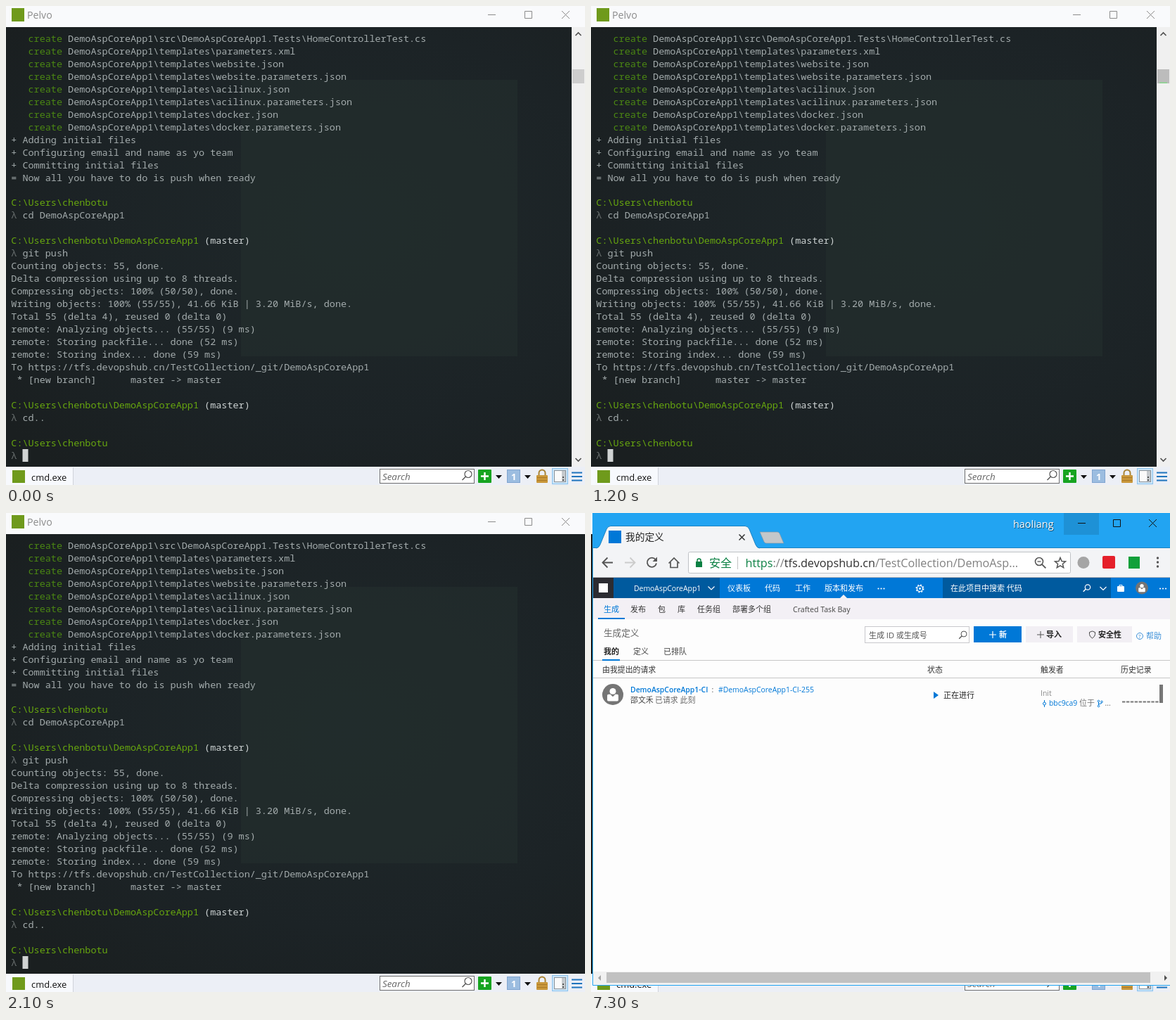
Animation, 823 px wide and 681 px high, one loop 8000 ms. Source, as an HTML page:

```html
<!DOCTYPE html>
<html lang="zh-CN">
<head>
<meta charset="utf-8">
<title>Push and build</title>
<style>
html, body { margin: 0; width: 100%; height: 100%; overflow: hidden; background: #1c2326; }
svg { display: block; width: 823px; height: 681px; }
text { white-space: pre; font-family: "Open Sans", "Noto Sans CJK SC", "Noto Sans CJK", sans-serif; }
.mono text { font: 13.47px "Noto Sans Mono", "DejaVu Sans Mono", monospace; }
</style>
</head>
<body>
<svg id="stage" viewBox="0 0 823 681" xmlns="http://www.w3.org/2000/svg"></svg>
<script>
const LOOP = 8000;
const USER = 'C:\\Users\\chenbotu';
const APP = 'DemoAspCoreApp1';
const BLUE = '#0078d7';

const rect = (x, y, w, h, fill, extra = '') =>
  `<rect x="${x}" y="${y}" width="${w}" height="${h}" fill="${fill}" ${extra}/>`;
const box = (x, y, w, h, fill, stroke) =>
  rect(x + .5, y + .5, w - 1, h - 1, fill, `stroke="${stroke}"`);
const disc = (x, y, r, fill, extra = '') =>
  `<circle cx="${x}" cy="${y}" r="${r}" fill="${fill}" ${extra}/>`;
const line = (d, stroke, w = 1, extra = '') =>
  `<path d="${d}" fill="none" stroke="${stroke}" stroke-width="${w}" ${extra}/>`;
const shape = (d, fill, extra = '') => `<path d="${d}" fill="${fill}" ${extra}/>`;
const text = (x, y, s, fill, size = 11, extra = '') =>
  `<text x="${x}" y="${y}" fill="${fill}" font-size="${size}" ${extra}>${s}</text>`;
const lens = (x, y, r, stroke, side = -1, w = 1.2) =>
  disc(x, y, r, 'none', `stroke="${stroke}" stroke-width="${w}"`) +
  line(`M${x + side * r * .7} ${y + r * .7}l${side * r} ${r}`, stroke, w + .3);
const dots = (x, y, dx, dy, r, fill) =>
  [0, 1, 2].map(i => disc(x + i * dx, y + i * dy, r, fill)).join('');
const winButtons = (x, y, gap, c) =>
  line(`M${x} ${y}.5h11M${x + gap} ${y - 4.5}h10v10h-10zM${x + gap * 2} ${y - 5}l11 11m0 -11l-11 11`, c);
const person = (x, y, r, fill, bg) =>
  disc(x, y, r, bg) + disc(x, y - r * .3, r * .3, fill) +
  rect(x - r * .53, y - r * .02, r * 1.06, r * .66, fill, `rx="${r * .12}"`) +
  shape(`M${x - r * .24} ${y - r * .02}h${r * .48}l${-r * .24} ${r * .24}z`, bg);

// Each row is a list of [column, colour key, string].
const INK = { c: '#4b8713', p: '#67a60f', t: '#a3abac', b: '#cdd3d3', l: '#676d6d' };
const row = s => [[0, 't', s]];
const made = s => [[3, 'c', 'create'], [10, 't', APP + '\\' + s]];
const path = [[0, 'p', USER]];
const repo = [[0, 'p', USER + '\\' + APP], [USER.length + APP.length + 2, 'b', '(master)']];
const cmd = s => [[0, 'l', 'λ'], [2, 't', s]];
const rows = [
  made(`src\\${APP}.Tests\\HomeControllerTest.cs`),
  ...['parameters.xml', 'website.json', 'website.parameters.json', 'acilinux.json',
    'acilinux.parameters.json', 'docker.json', 'docker.parameters.json']
    .map(f => made('templates\\' + f)),
  ...['+ Adding initial files', '+ Configuring email and name as yo team',
    '+ Committing initial files', '= Now all you have to do is push when ready'].map(row),
  [], path, cmd('cd ' + APP),
  [], repo, cmd('git push'),
  ...['Counting objects: 55, done.', 'Delta compression using up to 8 threads.',
    'Compressing objects: 100% (50/50), done.',
    'Writing objects: 100% (55/55), 41.66 KiB | 3.20 MiB/s, done.',
    'Total 55 (delta 4), reused 0 (delta 0)',
    'remote: Analyzing objects... (55/55) (9 ms)',
    'remote: Storing packfile... done (52 ms)',
    'remote: Storing index... done (59 ms)',
    'To https://tfs.devopshub.cn/TestCollection/_git/' + APP].map(row),
  [[1, 't', '* [new branch]'], [21, 't', 'master -&gt; master']],
  [], repo, cmd('cd..'),
  [], path, cmd('')
];

function consoleText() {
  return '<g class="mono">' + rows.map((parts, i) => parts.map(([col, ink, s]) =>
    text(7.3 + col * 8.082, (50.8 + i * 17.97).toFixed(1), s, INK[ink])).join('')).join('') + '</g>';
}

function statusBar() {
  return rect(0, 655, 823, 26, '#eceff6') + rect(0, 656, 95, 25, '#f7f9fd') +
    line('M95.5 656v25', '#cfd3da') +
    rect(9, 660, 18, 18, '#6f9a1c') + text(36, 675, 'cmd.exe', '#111', 12.9) +
    box(531, 658, 135, 21, '#fff', '#6d6d6d') +
    text(535, 673.5, 'Search', '#666', 13.4, 'font-style="italic"') +
    lens(657, 665.5, 5, '#555') +
    rect(671, 659, 19, 19, '#17a421', 'rx="1"') + line('M675 668.5h11M680.5 663v11', '#fff', 2.4) +
    shape('M696 667h9l-4.5 5zM737 667h9l-4.5 5z', '#111') +
    box(712, 659, 19, 19, '#9cbde0', '#7fa4cf') +
    text(718, 673.5, '1', '#fff', 13, 'font-weight="700"') +
    line('M757.5 668v-4a4.5 4.5 0 0 1 9 0v4', '#a98435', 2) +
    rect(754, 667, 16, 11, '#c9973a', 'rx="1"') + line('M755 670.5h14M755 674.5h14', '#a87827') +
    box(776, 657, 23, 23, '#cce6f9', '#8ac2ec') +
    box(779, 660, 17, 17, '#fafafa', '#8c9298') + rect(790, 661, 5, 15, '#c5c9cd') +
    rect(791, 669, 2, 2, '#555') + rect(791, 673, 2, 2, '#555') +
    line('M804 663.5h15M804 669h15M804 674.5h15', '#1f74bd', 2);
}

function terminal() {
  return rect(0, 0, 823, 30, '#f9fafc') + rect(8, 3, 18, 19, '#6f9a1c') +
    text(30, 18, 'Pelvo', '#8b8b8b', 14.2) + winButtons(685, 12, 52.5, '#8b8b8b') +
    rect(0, 30, 823, 625, 'url(#wall)') + rect(334, 105, 393, 393, '#24302d', 'opacity=".6"') +
    consoleText() + rect(23.5, 630, 8, 18, '#d0d3d3') +
    '<g id="bar">' + rect(804, 30, 19, 625, '#f0f0f0') +
    line('M809.5 42l4 -4l4 4M809.5 643l4 4l4 -4', '#505050', 1.6) +
    rect(805, 90, 17, 20, '#cdcdcd', 'id="thumb"') +
    rect(808, 108.5, 11, 1.5, '#86d58c', 'id="tick"') + '</g>' + statusBar();
}

function chrome() {
  const ink = '#555', rim = 'stroke="#1b82c2"';
  return rect(3, 0, 820, 671, '#22a4f2') + rect(3, 50, 820, 42, '#f3f4f6') +
    line('M3 49.5h820', '#1b82c2') +
    shape('M7 50q4 0 6 -5l9 -22q2 -4.5 6 -4.5h191q4 0 6 4.5l9 22q2 5 6 5', '#f3f4f6', rim) +
    rect(25, 25, 18, 18, BLUE) + text(49, 39, '我的定义', '#222', 13.7) +
    line('M210.5 30.5l8 8m0 -8l-8 8', '#333', 1.5) +
    shape('M240 27h25q2 0 3 2l6 14h-25q-2 0 -3 -2z', '#c4c7ca', 'stroke="#7d97a8" stroke-width=".7"') +
    text(600.8, 21.8, 'haoliang', '#123', 14.4, 'opacity=".7"') +
    text(600, 20.8, 'haoliang', '#fff', 14.4) +
    rect(672, 0, 50, 31, '#1a80be', 'id="hover"') + winButtons(692, 14, 50.5, '#111') +
    line('M31 70.5H17M23.5 63.5l-7 7l7 7', ink, 1.8) +
    line('M48 70.5h14M55.5 63.5l7 7l-7 7', '#ccc', 1.8) +
    line('M92 66.5a6.6 6.6 0 1 0 1 5', ink, 1.8) + shape('M94 62.5v6.5h-6.5z', ink) +
    line('M110.5 71.5l7.5 -7.5l7.5 7.5M113 70v7.5h10v-7.5', ink, 1.7) +
    rect(138.5, 55.5, 543, 30, '#fff', 'stroke="#bfc2c6" rx="2"') +
    rect(149, 69, 9, 8, '#0b8043') + line('M151 70v-2.5a2.5 2.5 0 0 1 5 0v2.5', '#0b8043', 1.5) +
    text(168, 76.5, '安全', '#0b8043', 16) + line('M208.5 62v18', '#c4c4c4') +
    text(219.5, 76.5, '<tspan fill="#0b8043">https</tspan>://<tspan fill="#303030">tfs.devopshub.cn</tspan>/TestCollection/DemoAsp...', '#808080', 16.2) +
    lens(637, 69, 5.5, ink, 1, 1.6) + line('M634.5 69h5', ink, 1.3) +
    line('M667 63.5l2.1 5l5.4 .4l-4.1 3.5l1.3 5.3l-4.7 -2.9l-4.7 2.9l1.3 -5.3l-4.1 -3.5l5.4 -.4z', ink, 1.5) +
    disc(700, 70.5, 8.5, '#a5a5a5') + rect(727, 61, 18, 18, '#e5202a', 'rx="2"') +
    rect(764, 62, 16, 17, '#12a03a') + dots(805.5, 64, 0, 6, 1.7, ink) +
    line('M3 91.5h820', '#b6b8bc');
}

function gear(x, y) {
  return disc(x, y, 4, 'none', 'stroke="#fff" stroke-width="1.2"') + disc(x, y, 1.4, '#fff') +
    disc(x, y, 5.2, 'none', 'stroke="#fff" stroke-width="1.5" stroke-dasharray="2 2.08"');
}

function nav() {
  const labels = [[194, '仪表板'], [247, '代码'], [290, '工作'], [332, '版本和发布']];
  const tabs = [[18, '生成'], [56, '发布'], [95, '包'], [123, '库'], [151, '任务组'], [201, '部署多个组']];
  return rect(3, 92, 820, 29, BLUE) + rect(3, 92, 29, 29, '#2c2c32') +
    rect(11, 100, 13, 13, '#fff') + rect(32, 92, 151, 29, '#005a9e') +
    text(61, 110.5, APP, '#fff', 10.4) + line('M166.5 104.5l4.5 4.5l4.5 -4.5', '#fff', 1.2) +
    labels.map(([x, s]) => text(x, 111, s, '#fff', 11, 'font-weight="500"')).join('') +
    dots(408.5, 107.5, 4, 0, 1.1, '#fff') + gear(467.5, 107.5) +
    rect(500, 92, 239, 29, '#005a9e') + text(511, 111, '在此项目中搜索 代码', '#fff') +
    lens(706, 105.5, 3.7, '#fff') + line('M723.5 105l4.5 4.5l4.5 -4.5', '#fff', 1.2) +
    rect(748, 104, 10, 8, '#fff', 'rx="1"') + line('M751 104v-1.5h4v1.5', '#fff') +
    person(783, 106.5, 9, '#fff', '#747474') + dots(809, 107.5, 4, 0, 1.1, '#fff') +
    shape('M354 121l5 -5l5 5z', '#f3f0f5') +
    rect(3, 121, 820, 30, '#f3f0f5') +
    tabs.map(([x, s], i) => text(x, 141, s, i ? '#333' : BLUE)).join('') +
    text(287, 141, 'Crafted Task Bay', '#444', 10.6) + rect(10, 149, 38, 2, BLUE);
}

function builds() {
  const head = [[16, '由我提出的请求'], [478, '状态'], [639, '触发者'], [753, '历史记录']];
  const bold = 'font-weight="600"';
  return rect(3, 151, 820, 501, '#fdfdfd') + text(18, 174.5, '生成定义', '#666', 12.6) +
    box(389, 161, 149, 24, '#fff', '#c8c8cc') + text(395, 177.5, '生成 ID 或生成号', '#555', 11) +
    lens(530, 172, 4, '#555', -1, 1) +
    rect(544, 161, 68, 23, BLUE) + line('M566 173h10M571 168v10', '#fff', 1.2) +
    text(580, 177, '新', '#fff', 11, 'font-weight="700"') +
    rect(618, 161, 67, 23, '#f2eff4') + line('M634 173h10M639 168v10', '#555') +
    text(647, 177, '导入', '#222', 11, 'font-weight="700"') +
    rect(691, 161, 78, 23, '#f2eff4') +
    line('M712.5 168l4 1.5v3q0 3 -4 5.5q-4 -2.5 -4 -5.5v-3z', '#444') +
    text(721, 177, '安全性', '#222', 11, 'font-weight="700"') +
    disc(780, 175, 4.5, 'none', 'stroke="#3a8fd8"') + text(778.1, 177.8, '?', '#3a8fd8', 8) +
    text(789, 178.5, '帮助', '#3a8fd8') +
    text(18, 201, '我的', '#222', 11, bold) + text(60, 201, '定义', '#444') +
    text(103, 201, '已排队', '#444') +
    line('M3 209.5h820', '#c6c6c6') + rect(16, 208, 25, 2, BLUE) +
    head.map(([x, s]) => text(x, 226.5, s, '#333', 10.9)).join('') +
    line('M3 234.5h820', '#c6c6c6') +
    person(31, 258, 15, '#fff', '#757575') +
    text(56, 255, APP + '-CI', BLUE, 10.4, bold) + text(171.5, 255, ':', '#555', 10.4) +
    text(181, 255, `#${APP}-CI-255`, BLUE, 10.4) +
    text(56, 269.5, '邵文禾', '#444', 10.9, 'font-weight="500"') + text(91, 269.5, '已请求 此刻', '#666', 10.9) +
    shape('M487 254l7 5l-7 5z', BLUE) + text(501, 263, '正在进行', '#222') +
    text(639, 260, 'Init', '#888', 10.4) +
    disc(644.5, 271, 2, 'none', `stroke="${BLUE}"`) + line('M644.5 266v3M644.5 273v3', BLUE) +
    text(651, 274, 'bbc9ca9', BLUE, 10.4) + text(694, 274, '位于', '#777') +
    line('M721.5 268.5v5M726 269.5q0 2 -4 2', BLUE) +
    [[721.5, 267.5], [726, 268.5], [721.5, 274.5]].map(([x, y]) => disc(x, y, 1.3, '#fff', `stroke="${BLUE}"`)).join('') +
    text(730.5, 274, '...', '#666', 10.4) +
    line('M755 268.5h52', '#777', 2, 'stroke-dasharray="4.4 1.5"') + rect(808, 244, 5, 26, '#777') +
    rect(3, 652, 820, 19, '#f1f1f1') + rect(22, 653, 773, 15, '#c1c1c1') +
    shape('M14 657v8l-4 -4z', '#a3a3a3') + shape('M815 657v8l4 -4z', '#505050');
}

const desktop = rect(0, 0, 823, 681, '#08243e') + rect(0, 0, 3, 283, '#1b7cc4') +
  rect(0, 310, 3, 210, 'url(#glow)');
const border = line('M2.5 0v671.5H823', '#22a4f2', 1, 'id="edge"');

const stage = document.getElementById('stage');
stage.innerHTML = `<defs>
  <radialGradient id="wall" cx=".6" cy=".45" r=".75">
    <stop offset="0" stop-color="#1f282a"/><stop offset=".6" stop-color="#1c2326"/><stop offset="1" stop-color="#1a1f20"/>
  </radialGradient>
  <linearGradient id="glow" x2="0" y2="1">
    <stop offset="0" stop-color="#1a72b8"/><stop offset=".7" stop-color="#12568e"/><stop offset="1" stop-color="#08243e"/>
  </linearGradient></defs>` +
  terminal() + `<g id="desk">${desktop}</g><g id="browser">${chrome() + nav() + builds()}</g>` + border;

const el = id => document.getElementById(id);
const [bar, thumb, tick, desk, browser, edge, hover] =
  ['bar', 'thumb', 'tick', 'desk', 'browser', 'edge', 'hover'].map(el);
const show = (node, on) => node.setAttribute('visibility', on ? 'inherit' : 'hidden');

function update(t) {
  thumb.setAttribute('fill', t < 1100 ? '#cdcdcd' : t < 1200 ? '#b9b9bd' : '#bcbcbc');
  hover.setAttribute('fill', t < 7300 ? '#1a80be' : '#1e91d6');
  show(tick, t >= 1200);
  show(bar, t < 2100);
  show(desk, t >= 7100 && t < 7300);
  show(browser, t >= 7100);
  show(edge, t >= 7300);
}

const start = performance.now();
function frame() {
  update((performance.now() - start) % LOOP);
  requestAnimationFrame(frame);
}
frame();
</script>
</body>
</html>
```
